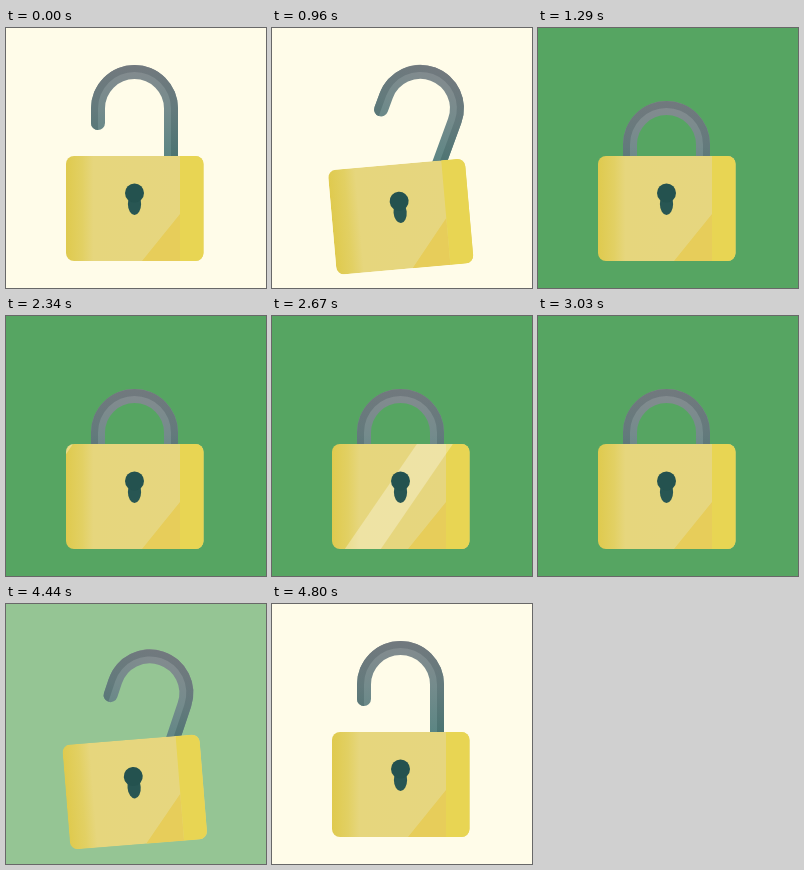
These frames come from a looping animation (260 px wide and 260 px high, 5400 ms). An HTML page:

```html
<!DOCTYPE html>
<html lang="en">
<head>
<meta charset="utf-8">
<title>Padlock</title>
<style>
  html, body { margin: 0; width: 100%; height: 100%; overflow: hidden; background: #fffce9; }
  svg { display: block; width: 100vw; height: 100vh; }
</style>
</head>
<body>
<svg viewBox="0 0 260 260">
  <defs>
    <linearGradient id="steel" gradientUnits="userSpaceOnUse" x1="0" y1="37" x2="0" y2="128">
      <stop offset="0" stop-color="#858b8f"/>
      <stop offset=".5" stop-color="#748b8c"/>
      <stop offset="1" stop-color="#5b8583"/>
    </linearGradient>
    <linearGradient id="rim" gradientUnits="userSpaceOnUse" x1="0" y1="37" x2="0" y2="128">
      <stop offset="0" stop-color="#72797e"/>
      <stop offset=".5" stop-color="#637a7c"/>
      <stop offset="1" stop-color="#4b7472"/>
    </linearGradient>
    <linearGradient id="brass" gradientUnits="userSpaceOnUse" x1="60" y1="0" x2="174" y2="0">
      <stop offset="0" stop-color="#dfca4e"/>
      <stop offset=".14" stop-color="#e2d063"/>
      <stop offset=".24" stop-color="#e6d67d"/>
      <stop offset="1" stop-color="#e6d67f"/>
    </linearGradient>
    <clipPath id="case"><rect x="60" y="128" width="137.5" height="105" rx="8"/></clipPath>
  </defs>
  <rect id="bg" width="260" height="260"/>
  <g id="lock">
    <g id="shackle">
      <path d="M92 95V80.5A36.5 36.5 0 0 1 165 80.5V148" fill="none" stroke="url(#steel)" stroke-width="14" stroke-linecap="round"/>
      <path d="M92 102A7 7 0 0 1 85 95V80.5A43.5 43.5 0 0 1 172 80.5V148H165V80.5A36.5 36.5 0 0 0 92 80.5Z" fill="url(#rim)"/>
    </g>
    <g clip-path="url(#case)">
      <rect x="60" y="128" width="138" height="105" fill="url(#brass)"/>
      <path d="M136 233L174 186V233Z" fill="#e7cd5a"/>
      <rect x="174" y="128" width="24" height="105" fill="#e8d553"/>
      <path id="shine" fill="#fff" opacity=".3"/>
    </g>
    <ellipse cx="128.5" cy="176" rx="6.6" ry="11" fill="#285653"/>
    <circle cx="128.5" cy="165" r="9.5" fill="#24524f"/>
  </g>
</svg>
<script>
  const LOOP = 5400, MOVE = 590, CLOSE = 700, OPEN = 4210;
  const DROP = 36, CREAM = [255, 252, 233], GREEN = [86, 165, 98];
  const el = id => document.getElementById(id);
  const [bg, lock, shackle, shine] = ['bg', 'lock', 'shackle', 'shine'].map(el);

  const span = (t, from, length) => Math.min(1, Math.max(0, (t - from) / length));
  const smooth = u => u * u * (3 - 2 * u);
  const bump = u => Math.sin(Math.PI * u) ** 2;

  function draw(t) {
    const a = span(t, CLOSE, MOVE), b = span(t, OPEN, MOVE);
    const swing = bump(a) + bump(b);
    const slide = DROP * (b > 0 ? (1 - b) ** 2.1 : a ** 2.8);

    // The body tips one way while the shackle swings the other about its hinge.
    lock.setAttribute('transform',
      `translate(0 ${8.4 * swing}) rotate(${-5.2 * swing} 128.5 180.5)`);
    shackle.setAttribute('transform',
      `rotate(${26 * swing} 165 145) translate(0 ${slide})`);

    const green = smooth(span(t, 970, 280)) - smooth(span(t, OPEN, 560));
    const mix = CREAM.map((c, i) => Math.round(c + (GREEN[i] - c) * green));
    bg.setAttribute('fill', `rgb(${mix})`);

    // Slanted glint crossing the closed body.
    const lead = 151 + (t - 2330) * 0.345;
    const top = lead - 87.8, low = lead - 159.8;
    shine.setAttribute('d', `M${top} 128H${top - 36}L${low - 36} 233H${low}Z`);
    shine.style.display = t >= 2340 && t < 3030 ? '' : 'none';
  }

  const start = performance.now();
  function tick() {
    draw((performance.now() - start) % LOOP);
    requestAnimationFrame(tick);
  }
  tick();
</script>
</body>
</html>
```
